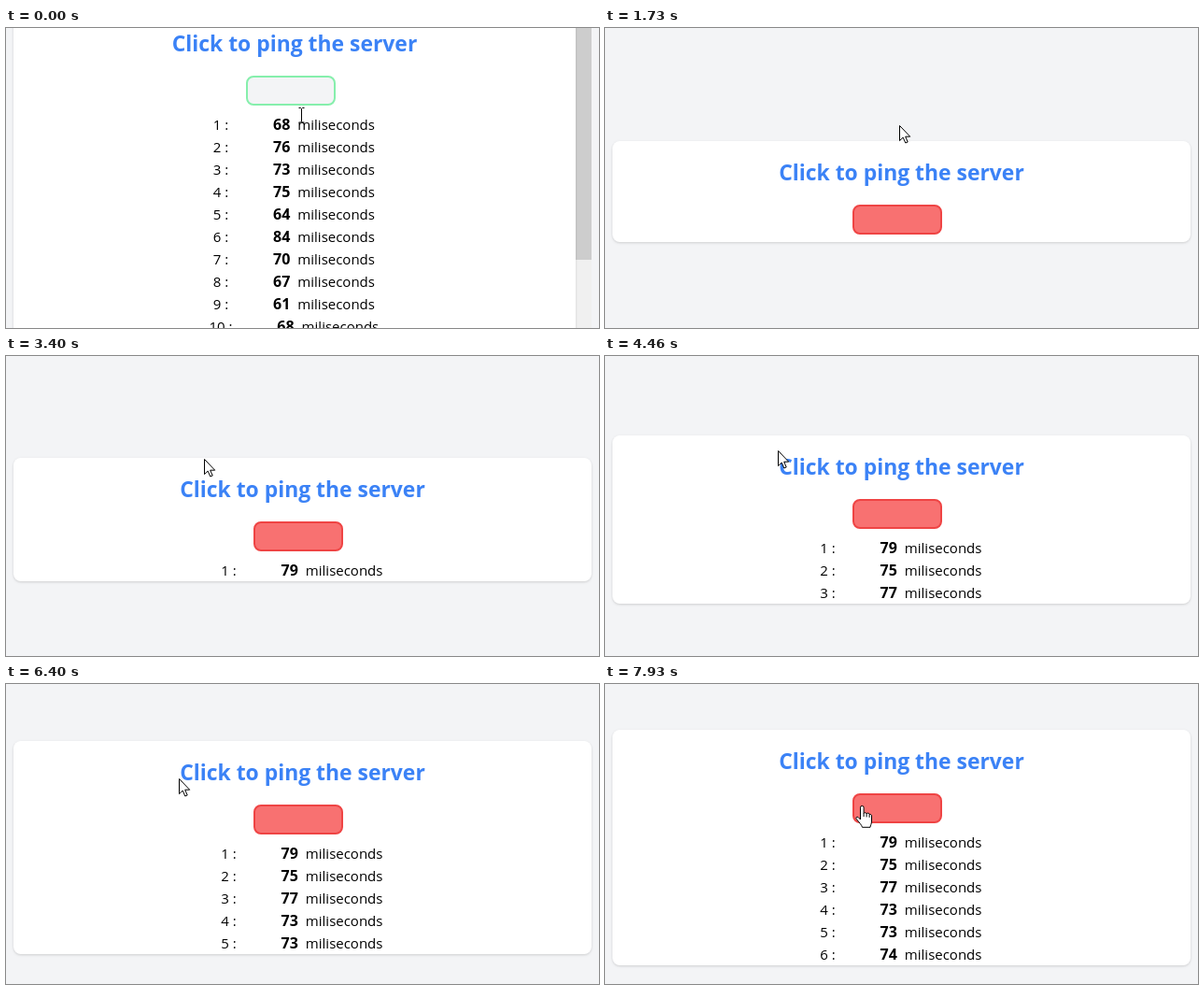
Recreate the animation shown at these times as an HTML page. Size 635 by 321 pixels, loop 8000 ms.

```html
<!DOCTYPE html>
<html lang="en">
<head>
<meta charset="utf-8">
<title>Ping the server</title>
<style>
  html, body { margin: 0; width: 100%; height: 100%; overflow: hidden; background: #f3f4f6; }
  svg { display: block; width: 100%; height: 100%; }
  text { font: 15px "Open Sans", "Noto Sans", sans-serif; white-space: pre; }
  .title { font-size: 22.9px; font-weight: 700; fill: #3b82f6; text-anchor: middle; }
  .value { font-size: 16px; font-weight: 700; }
  .card {
    fill: #fff;
    filter: drop-shadow(0 1px 1.5px rgba(0, 0, 0, .1)) drop-shadow(0 1px 1px rgba(0, 0, 0, .06));
  }
  .button { stroke-width: 2; }
  #cursor path { fill: #fff; stroke: #000; stroke-linejoin: round; }
  #cursor .line { fill: none; }
</style>
</head>
<body>
<svg id="stage" viewBox="0 0 635 321">
  <g id="scrollbar">
    <rect x="610" width="17" height="321" fill="#f0f0f0"/>
    <rect x="610" width="17" height="248" fill="#cdcdcd"/>
  </g>
  <g id="cursor">
    <g id="arrow">
      <path d="M.5.5V16.6L4.2 13.1 6.8 19 9.2 18 6.7 12.2H11.7Z"/>
    </g>
    <g id="hand">
      <path d="M-1.5 15V2.2a1.8 1.8 0 0 1 3.6 0V8.6a1.6 1.6 0 0 1 3 .3 1.6 1.6 0 0 1 3 .8 1.5 1.5 0 0 1 2.4 1.3V17c0 3-1.5 4.5-1.5 6.3H.5C0 21-3 18-5.8 14.4c-1-1.6.6-2.8 2-1.8Z"/>
      <path class="line" d="M2.1 8.6V12M5.1 9V12.4M8.1 9.8V12.8"/>
    </g>
    <g id="beam">
      <path class="line" d="M-2.5 -7.5H-.5L.5 -6.5 1.5 -7.5H3.5M.5 -6.5V7M-2.5 8H-.5L.5 7 1.5 8H3.5"/>
    </g>
  </g>
</svg>
<script>
const LOOP = 8000, FPS = 15;
const RESET = 17;                               // step at which the old list is cleared
const ROW_STEPS = [37, 52, 67, 81, 96, 112];
const OLD_VALUES = [68, 76, 73, 75, 64, 84, 70, 67, 61, 68];
const NEW_VALUES = [79, 75, 77, 73, 73, 74];

// Pointer path: step, x, y, shape from that step on
const PATH = [
  [0, 316, 93, 'beam'], [1, 319, 78, 'hand'], [3, 321, 45, 'arrow'], [4, 317, 33, 'arrow'],
  [6, 309, 53, 'hand'], [8, 306, 61, 'hand'], [15, 306, 61, 'arrow'], [22, 306, 61, 'arrow'],
  [26, 315, 104, 'arrow'], [28, 313, 140, 'beam'], [30, 308, 160, 'beam'], [32, 301, 138, 'arrow'],
  [35, 294, 120, 'arrow'], [37, 290, 113, 'arrow'], [38, 290, 113, 'arrow'], [39, 290, 130, 'beam'],
  [41, 292, 162, 'arrow'], [44, 292, 162, 'arrow'], [45, 286, 155, 'beam'], [48, 250, 126, 'arrow'],
  [51, 212, 110, 'arrow'], [54, 185, 101, 'arrow'], [113, 185, 101, 'arrow'], [114, 191, 104, 'arrow'],
  [116, 232, 118, 'arrow'], [118, 268, 128, 'hand'], [119, 275, 130, 'hand']
];

const $ = id => document.getElementById(id);
const mix = (a, b, p) => a + (b - a) * p;
const mixColor = (a, b, p) => `rgb(${a.map((v, i) => Math.round(mix(v, b[i], p)))})`;
const show = (el, on) => el.setAttribute('visibility', on ? 'visible' : 'hidden');
const move = (el, x, y) => el.setAttribute('transform', `translate(${x} ${y})`);

function add(parent, tag, attrs, text = '') {
  const el = document.createElementNS('http://www.w3.org/2000/svg', tag);
  for (const name in attrs) el.setAttribute(name, attrs[name]);
  el.textContent = text;
  parent.append(el);
  return el;
}

// A card whose y positions are relative to its top edge
function buildCard(width, buttonX, values) {
  const mid = 8 + width / 2;
  const root = add($('stage'), 'g', {});
  const box = add(root, 'rect', { class: 'card', x: 8, width, height: 400, rx: 8 });
  add(root, 'text', { class: 'title', x: mid, y: 42 }, 'Click to ping the server');
  const button = add(root, 'rect', { class: 'button', x: buttonX + 1, y: 69, width: 94, height: 30, rx: 7 });
  const rows = values.map((value, i) => {
    const row = add(root, 'g', {});
    const y = 126 + 24 * i, extra = i > 8 ? 4.3 : 0;
    add(row, 'text', { x: mid - 87.3 - extra, y }, `${i + 1} :`);
    add(row, 'text', { class: 'value', x: mid - 23 + extra, y }, value);
    add(row, 'text', { x: mid + 3.3 + extra, y }, 'miliseconds');
    return row;
  });
  return { root, box, button, rows };
}

// p: 0 = idle, 1 = busy
function paintButton(button, p) {
  button.setAttribute('fill', mixColor([243, 244, 246], [248, 113, 113], p));
  button.setAttribute('stroke', mixColor([134, 239, 172], [239, 68, 68], p));
}

const oldCard = buildCard(602, 257, OLD_VALUES);
const newCard = buildCard(619, 265, NEW_VALUES);
move(oldCard.root, 0, -17);
paintButton(newCard.button, 1);
$('stage').append($('cursor'));

function drawCursor(step) {
  let i = PATH.length - 1;
  while (PATH[i][0] > step) i--;
  const [s, x, y, shape] = PATH[i];
  const [s2, x2, y2] = PATH[i + 1] || [s + 1, x, y];
  const p = (step - s) / (s2 - s);
  move($('cursor'), Math.round(mix(x, x2, p)), Math.round(mix(y, y2, p)));
  for (const id of ['arrow', 'hand', 'beam']) show($(id), id === shape);
}

function draw(step) {
  const cleared = step >= RESET;
  oldCard.root.style.display = $('scrollbar').style.display = cleared ? 'none' : '';
  newCard.root.style.display = cleared ? '' : 'none';
  paintButton(oldCard.button, Math.min(1, Math.max(0, (step - 13) * .4)));

  const count = ROW_STEPS.filter(s => step >= s).length;
  move(newCard.root, 0, 121 - 12 * count);
  newCard.box.setAttribute('height', 108 + 24 * count);
  newCard.rows.forEach((row, i) => show(row, i < count));
  drawCursor(step);
}

const start = performance.now();
function tick() {
  const t = (performance.now() - start) % LOOP;
  draw(Math.min(119, Math.floor((t + 7) * FPS / 1000)));
  requestAnimationFrame(tick);
}
tick();
</script>
</body>
</html>
```
